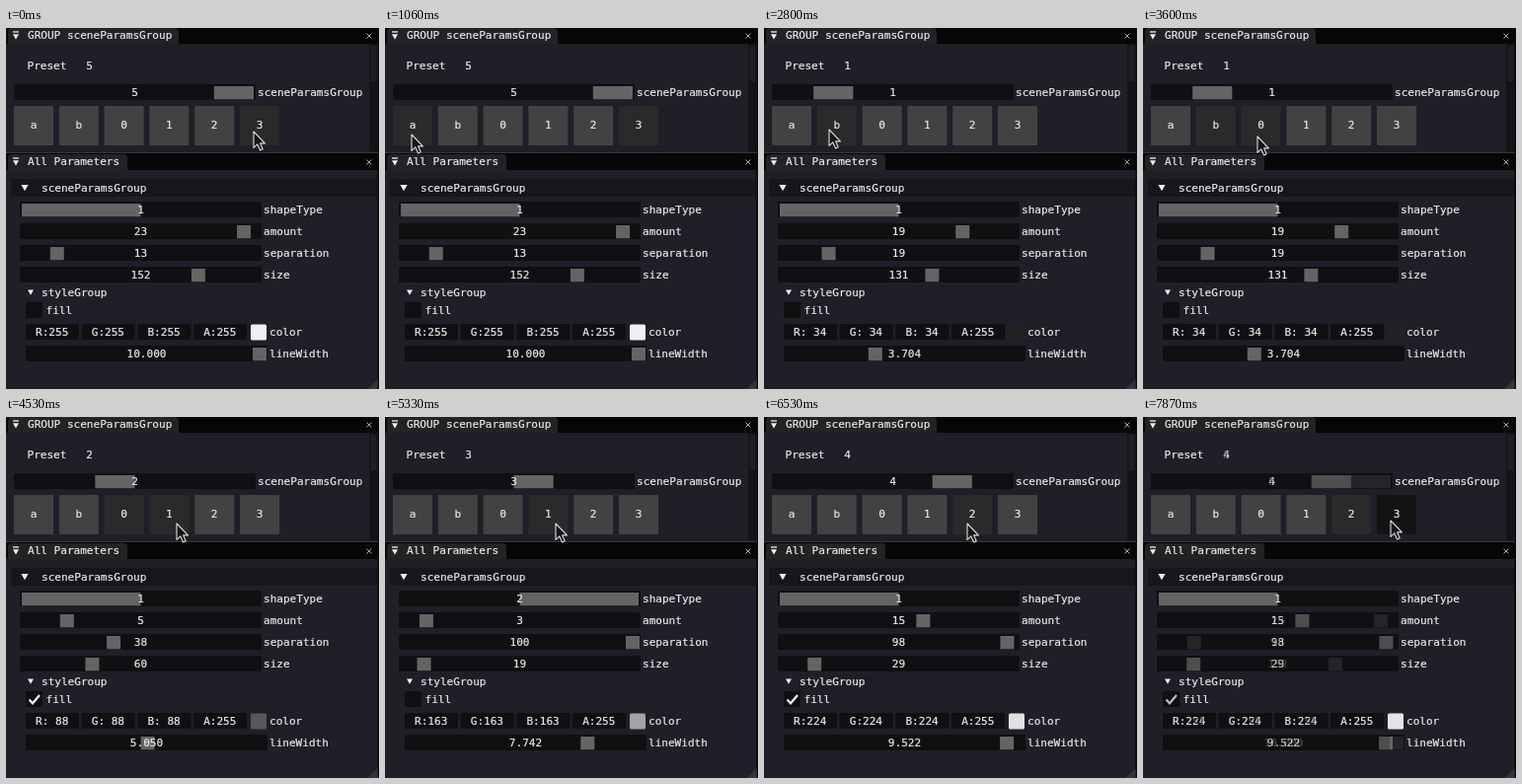
These frames come from a looping animation (378x366 px, 8000 ms). An HTML page:

```html
<!DOCTYPE html>
<html lang="en">
<head>
<meta charset="utf-8">
<title>Parameter presets</title>
<style>
  html, body { margin: 0; width: 100%; height: 100%; overflow: hidden; background: #050506; }
  svg { display: block; width: 378px; height: 366px; }
  text { font: 11.05px "DejaVu Sans Mono", monospace; fill: #e8e8e8; stroke: #e8e8e8; stroke-width: .2; white-space: pre; }
  .mid { text-anchor: middle; }
</style>
</head>
<body>
<svg viewBox="0 0 378 366">
  <g id="base"></g>
  <g id="live"></g>
  <g id="next" opacity=".25"></g>
  <g id="buttons"></g>
  <path id="cursor" d="M0 0V16.4L3.8 12.9L6.6 19L9.2 17.8L6.6 11.9H11.4Z" fill="#161616" stroke="#dcdcdc" stroke-width="1.1" stroke-linejoin="round"/>
</svg>
<script>
const TICK = 400 / 3, TICKS = 60, MOVE = 3;
const PANEL = '#1f1f28', FRAME = '#101012', GRAB = '#646465';
const $ = id => document.getElementById(id);

// One visit per button: the ticks when the pointer sets off and the preset loads, and where it rests.
const visits = [
  { go: 1,  load: 16, x: 27,  y: 108 },
  { go: 14, load: 21, x: 66,  y: 103 },
  { go: 25, load: 30, x: 116, y: 110 },
  { go: 32, load: 39, x: 173, y: 108 },
  { go: 41, load: 49, x: 206, y: 108 },
  { go: 51, load: 60, x: 251, y: 105 }
];

// Displayed values, one per preset.
const amount = [6, 19, 5, 3, 15, 23];
const separation = [100, 19, 38, 100, 98, 13];
const size = [42, 131, 60, 19, 29, 152];
const grey = [0, 34, 88, 163, 224, 255];
const lineWidth = [1, 3.704, 5.05, 7.742, 9.522, 10];

const rect = (x, y, w, h, fill, r = 0) =>
  `<rect x="${x}" y="${y}" width="${w}" height="${h}" rx="${r}" fill="${fill}"/>`;
const text = (x, y, s, cls = '') => `<text class="${cls}" x="${x}" y="${y}">${s}</text>`;
const shape = (d, fill) => `<path d="${d}" fill="${fill}"/>`;
const arrow = (x, y, r) => shape(`M${x - r} ${y - r * .8}h${2 * r}l${-r} ${r * 1.7}z`, '#f0f0f0');

const slider = (x, y, from, width, value) =>
  rect(x, y, 245, 16, FRAME, 1) + rect(from, y + 2, width, 13.3, GRAB) +
  text(x + 122.5, y + 12, value, 'mid');

// A slider over a few choices, whose grab fills one share of the track.
const choice = (x, y, i, count, value) =>
  slider(x, y, x + 2 + 241 / count * i, 241 / count, value);

// A slider over a range, with a small grab.
const range = (x, y, v, min, max, label = v) =>
  slider(x, y, x + 1 + 229 * (v - min) / (max - min), 14, label);

const titleBar = (y, tab, label) =>
  rect(0, y, 378, 16, '#070708') +
  shape(`M2 ${y + 16}V${y + 4}q0-4 4-4H${tab - 4}q4 0 4 4v12z`, '#232326') +
  rect(7, y + 3.3, 6, 1.3, '#f0f0f0') + arrow(10, y + 8.7, 3) + text(22, y + 11, label) +
  `<path d="M365.5 ${y + 5.5}l5 5m0-5l-5 5" stroke="#a8a8a8"/>`;

const base = () =>
  rect(0, 16, 376.5, 110, PANEL) + rect(368, 16, 8.5, 109, '#141418') +
  rect(369.5, 18, 6, 36, '#1f1f22') + rect(0, 126, 377, 1, '#36363b') +
  rect(0, 144, 376.5, 222, PANEL) +
  titleBar(0, 175, 'GROUP sceneParamsGroup') + titleBar(128, 123, 'All Parameters') +
  text(255, 69, 'sceneParamsGroup') +
  rect(5, 153, 371, 18, '#17171b') + arrow(19, 162, 3.6) + text(36, 166, 'sceneParamsGroup') +
  ['shapeType', 'amount', 'separation', 'size'].map((s, i) => text(261, 188 + 22 * i, s)).join('') +
  arrow(25, 268, 3) + text(36, 272, 'styleGroup') + text(40.5, 290, 'fill') +
  text(267, 312, 'color') + text(267, 334, 'lineWidth') +
  shape('M376.5 356V366H366.5z', '#35353c');

function params(n) {
  const c = grey[n], wide = n % 3 === 0, filled = n % 2 === 0;
  const channel = (k, i) => rect(20 + 56.7 * i, 300, 54, 16, FRAME, 1) +
    text(46.7 + 56.7 * i, 312, k + ':' + String(k === 'A' ? 255 : c).padStart(3), 'mid');
  const shade = Math.min(c, 240);
  return rect(20, 30, 75, 16, PANEL) + text(21.5, 42, 'Preset   ' + n) +
    choice(8, 57, n, 6, n) +
    choice(14, 176, +wide, 2, wide + 1) +
    range(14, 198, amount[n], 1, 24) +
    range(14, 220, separation[n], 0, 100) +
    range(14, 242, size[n], 4, 200) +
    rect(20, 278, 17, 16, FRAME, 1) +
    (filled ? '<path d="M23.5 286.5l3.5 3.8L34 282" fill="none" stroke="#f4f4f4" stroke-width="2.2"/>' : '') +
    [...'RGBA'].map(channel).join('') +
    rect(248, 300.5, 16, 16, `rgb(${shade},${shade},${shade})`, 1.5) +
    range(20, 322, lineWidth[n], 0, 10, lineWidth[n].toFixed(3));
}

const buttons = (selected, hover, pressed) => [...'ab0123'].map((s, i) => {
  const fill = i === pressed ? '#131314' : i === selected || i === hover ? '#2a2a2b' : '#424243';
  const x = 8 + 45.8 * i;
  return rect(x, 79, 40, 40, fill, 1) + text(x + 20, 102, s, 'mid');
}).join('');

function render(tick) {
  const current = visits.findLastIndex(v => v.load <= tick);
  const selected = current < 0 ? 5 : current;
  const pressed = visits.findIndex(v => v.load === tick + 1);
  const hover = visits.findLastIndex(v => v.go < tick);

  const heading = visits.findLastIndex(v => v.go <= tick);
  const to = visits.at(heading), from = visits.at(heading - 1);
  const left = heading < 0 ? 0 : Math.max(0, 1 - (tick - to.go + 1) / MOVE) ** 2;
  const x = to.x + (from.x - to.x) * left;
  const y = to.y + (from.y - to.y) * left;

  $('live').innerHTML = params(selected);
  $('next').innerHTML = pressed < 0 ? '' : params(pressed);
  $('buttons').innerHTML = buttons(selected, hover, pressed);
  $('cursor').setAttribute('transform', `translate(${x} ${y})`);
}

let shown = -1;
function draw() {
  // Ticks fall on times rounded down to 10 ms.
  const tick = Math.floor((performance.now() + 7) / TICK) % TICKS;
  if (tick !== shown) render(shown = tick);
  requestAnimationFrame(draw);
}

$('base').innerHTML = base();
draw();
</script>
</body>
</html>
```
